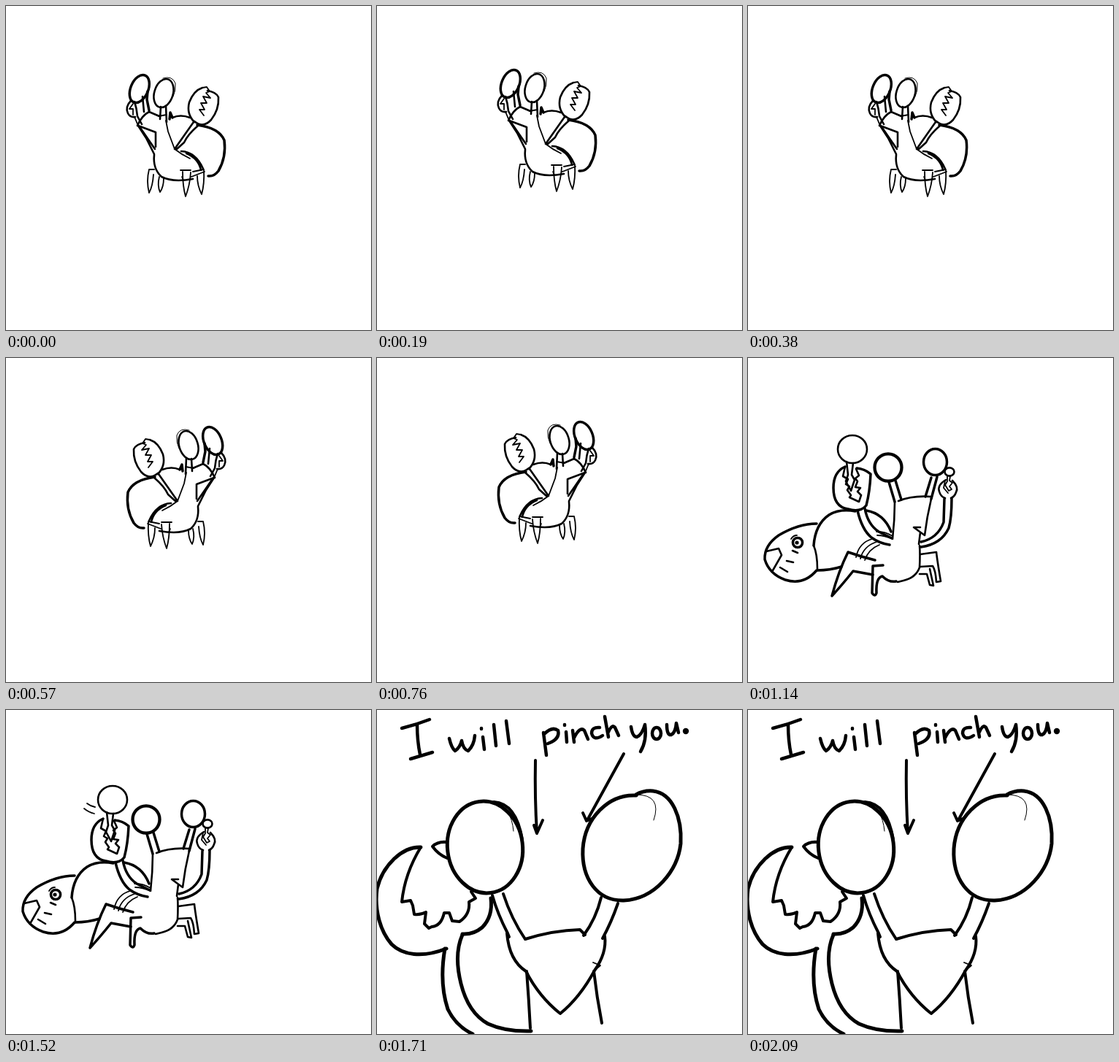
Recreate the animation shown at these times as an HTML page. Size 500x444 px, loop 2280 ms.

```html
<!DOCTYPE html>
<html lang="en">
<head>
<meta charset="utf-8">
<title>Pinching crab</title>
<style>
html, body { margin: 0; width: 100%; height: 100%; overflow: hidden; background: #fff; }
svg { display: block; width: 100vw; height: 100vh; }
path, ellipse { fill: none; stroke: #000; stroke-linecap: round; stroke-linejoin: round; }
.hair { stroke-width: 1; }
.thin { stroke-width: 1.8; }
.mid { stroke-width: 2.6; }
.bold { stroke-width: 3.5; }
.heavy { stroke-width: 4.3; }
#close .bold { stroke-width: 4; }
#close .heavy { stroke-width: 5; }
#words .heavy { stroke-width: 4.5; }
.dot { fill: #000; stroke: none; }
</style>
</head>
<body>
<svg viewBox="0 0 500 444" role="img" aria-label="A small crab dances, then says: I will pinch you.">
  <g id="dance">
    <!-- eyes and stalks -->
    <ellipse class="bold" cx="182.8" cy="113.5" rx="12" ry="20" transform="rotate(23 182.8 113.5)"/>
    <ellipse class="mid" cx="216" cy="119.5" rx="12.8" ry="20" transform="rotate(17 216 119.5)"/>
    <path class="hair" d="M215 99Q228 95 232 106Q233 116 229 124"/>
    <path class="bold" d="M194 117L193 128L196 143"/>
    <path class="mid" d="M187 124L189 145M212 138L211 155M219 137L220 159"/>
    <!-- far claw and arms -->
    <path class="mid" d="M171 130Q163 138 167 147Q170 153 177 152M176 131Q179 140 180 151L186 162"/>
    <path class="thin" d="M174 134L169 141L174 141L174 149M176 152L181 164"/>
    <path class="mid" d="M181 164L192 181L203 203M184 167L204 196"/>
    <!-- head and body -->
    <path class="mid" d="M180 164Q186 150 196 145L210 151M181 164L205 173L205 193"/>
    <path class="thin" d="M209 151L220 149M219 157L222 172L231 196"/>
    <path class="mid" d="M203 204Q201 223 213 234Q228 242 256 237"/>
    <path class="thin" d="M231 196Q241 204 252 209M241 234L243 239"/>
    <!-- shell -->
    <path class="bold" d="M224 155L225 146L228 153"/>
    <path class="mid" d="M228 153Q239 148 252 153M240 199Q260 200 270 223M247 202Q264 209 267 225"/>
    <path class="bold" d="M262 163Q292 167 299 184Q302 207 291 226Q285 234 277 233"/>
    <!-- near claw -->
    <path class="mid" d="M269 112Q257 116 251 132Q247 148 258 159M258 158Q270 168 281 156Q292 142 291 125Q288 118 276 116"/>
    <path class="thin" d="M269 112L275 111L279 117L274 119L280 126L270 124L275 133L267 133L272 142L265 142L271 150"/>
    <path class="mid" d="M257 159L231 196M263 164Q249 176 244 187L234 196"/>
    <!-- legs -->
    <path class="thin" d="M203 224L196 224Q192 240 196 256Q201 247 202 231M210 234Q207 246 211 255Q216 248 216 236"/>
    <path class="thin" d="M239 225L253 225M242 227Q242 247 246 261Q252 245 253 228M256 227L271 224Q272 244 268 258Q262 246 262 233M254 234L272 227"/>
  </g>

  <g id="pinch">
    <!-- shell with its face -->
    <path class="bold" d="M94 227Q69 227 42 243Q22 257 23 276Q29 296 51 304Q76 312 94 291"/>
    <path class="mid" d="M25 265L42 261L46 270L34 291M44 287L54 293M53 278L62 280M61 264L68 267"/>
    <ellipse class="bold" cx="68" cy="253" rx="6.6" ry="6.6"/>
    <ellipse class="dot" cx="67" cy="253" rx="2.6" ry="2.6"/>
    <path class="thin" d="M59 248Q62 243 67 243"/>
    <path class="bold" d="M90 257Q92 228 111 215Q126 206 147 210M162 209Q186 213 196 238M95 291Q112 291 128 286"/>
    <path class="mid" d="M90 257Q95 269 95 289"/>
    <path class="thin" d="M148 273Q152 253 170 248M154 275Q158 258 176 252M160 277Q165 262 180 256M176 238Q186 237 198 244M177 243Q187 243 198 248"/>
    <!-- left arm and claw -->
    <path class="bold" d="M133 149Q117 156 117 178Q117 204 137 207Q154 212 162 202Q167 183 168 159Q160 152 149 151"/>
    <path class="bold" d="M150 209Q156 235 169 246Q180 254 194 256M160 206Q164 228 179 238L197 247"/>
    <path class="mid" d="M133 149L130 162L137 166L134 173L139 176L136 181L141 188L139 191L152 197L155 188L150 183L154 178L147 177L150 169L147 165L152 161L148 152"/>
    <g id="prey">
      <ellipse class="mid" cx="146" cy="123" rx="20" ry="19"/>
      <path class="mid" d="M138 140L140 158L137 167L144 180M147 142L145 158L149 165L144 180"/>
    </g>
    <path id="whoosh" class="thin" d="M111 128Q116 132 122 133M107 135Q113 140 121 142"/>
    <!-- eyes, stalks and head -->
    <ellipse class="heavy" cx="192" cy="150" rx="18.5" ry="18.7"/>
    <ellipse class="bold" cx="256.5" cy="142.5" rx="16" ry="18"/>
    <path class="bold" d="M193 170L201 197M202 168L210 194M251 164L243 190M259 163L251 193"/>
    <path class="mid" d="M206 196Q225 188 251 190M201 197Q201 222 198 248M251 193Q245 218 242 243L227 232L236 232M236 239L234 255"/>
    <path class="mid" d="M235 257Q236 269 235 287Q230 301 213 305L205 307"/>
    <!-- right arm and claw -->
    <path class="bold" d="M237 252Q260 247 268 225L269 193M237 259Q265 255 275 233Q279 219 279 192"/>
    <path class="mid" d="M271 167Q259 174 262 183Q264 190 270 192M280 168Q289 177 285 184Q283 190 278 192"/>
    <ellipse class="mid" cx="276" cy="156" rx="6.5" ry="5.6"/>
    <path class="thin" d="M273 161L273 169L270 174L275 182L279 180L276 176L280 171L276 168L277 162M270 168L268 178L274 185"/>
    <!-- legs -->
    <path class="bold" d="M174 277Q154 272 137 266Q124 292 115 326Q128 312 144 292L171 297"/>
    <path class="bold" d="M185 284L171 285L170 322Q174 328 176 322Q175 301 184 299Q193 308 203 306"/>
    <path class="mid" d="M236 269L258 266Q259 276 264 306L258 307Q257 291 253 285L236 286M235 296L245 296L249 311L254 312L249 289"/>
  </g>

  <g id="close">
    <!-- eyes -->
    <ellipse class="heavy" cx="148" cy="188" rx="51.5" ry="63" transform="rotate(-7 148 188)"/>
    <path class="bold" d="M160 126Q191 128 199 178"/>
    <path class="hair" d="M161 125Q184 133 187 166"/>
    <path class="heavy" d="M355 117C317 115 285 148 282 190C280 230 301 262 338 261C381 259 412 220 416 183C418 148 405 114 378 111Q365 110 355 116"/>
    <path class="hair" d="M355 116Q391 116 379 151"/>
    <!-- claw and arm -->
    <path class="bold" d="M95 181Q83 180 76 187Q84 198 96 203"/>
    <path class="heavy" d="M60 188C35 187 8 212 0 245C-4 275 5 304 20 321C35 336 62 340 95 327"/>
    <path class="bold" d="M60 188Q38 224 34 263L46 261L49 268L51 280Q60 281 67 277L65 293L71 299L75 297Q88 296 92 278L99 278L103 289L113 290Q128 280 126 263L135 258L129 249"/>
    <path class="heavy" d="M156 258Q159 283 144 298Q132 308 117 307"/>
    <path class="heavy" d="M93 327Q85 374 97 410Q108 433 131 444M117 308Q105 335 115 375Q125 415 152 430Q176 441 211 440"/>
    <!-- stalks and head -->
    <path class="bold" d="M158 254Q165 279 179 306L181 311M173 252Q184 286 203 314M307 257Q300 286 283 309M330 265Q321 291 309 313"/>
    <path class="bold" d="M203 314Q241 302 278 301L285 308M178 306Q181 343 204 358Q222 393 251 416Q278 394 298 357Q315 333 312 310"/>
    <path class="bold" d="M205 358Q208 397 210 436M297 358Q301 393 308 429"/>
    <path class="thin" d="M296 346L306 350L298 357M200 354L207 361"/>
    <!-- arrows -->
    <path class="bold" d="M217 69Q216 120 219 169M215 158L219 169L227 151M338 60L288 151M282 141L287 152L294 149"/>
    <!-- hand lettering: "I will pinch you." -->
    <g id="words">
      <path class="heavy" d="M34 25Q54 20 72 13M55 20Q55 42 59 61M46 67L76 58"/>
      <path class="heavy" d="M99 39Q102 52 107 56Q114 51 116 42Q118 54 125 56Q133 48 134 35"/>
      <path class="heavy" d="M145 37L147 54M143 25L143 26M160 20L163 49M177 15L181 46"/>
      <path class="heavy" d="M228 31L232 62M229 33Q240 22 248 28Q251 40 234 46"/>
      <path class="heavy" d="M259 30L260 44M257 20L257 21M268 28L270 44M270 38Q278 22 284 28L289 40"/>
      <path class="heavy" d="M305 24Q294 23 294 32Q297 43 309 35M312 9L317 37M317 30Q322 19 326 24L331 35"/>
      <path class="heavy" d="M348 23Q350 37 356 37Q363 34 367 20M367 20Q370 42 361 57"/>
      <ellipse class="heavy" cx="383" cy="32" rx="6" ry="8"/>
      <path class="heavy" d="M397 20Q397 35 403 34Q409 31 410 18L413 31"/>
      <ellipse class="dot" cx="423" cy="29" rx="4.2" ry="4.2"/>
    </g>
  </g>
</svg>
<script>
const STEP = 190, STEPS = 12;
const [dance, pinch, close, prey, whoosh, words] =
  ["dance", "pinch", "close", "prey", "whoosh", "words"].map(id => document.getElementById(id));
const sways = ["translate(-3 2)", "rotate(-20 144 178)", ""];

const show = (el, on) => el.setAttribute("visibility", on ? "inherit" : "hidden");
const move = (el, value) => el.setAttribute("transform", value);

function draw(time) {
  const step = Math.floor(time / STEP) % STEPS;
  const beat = step % 3;
  show(dance, step < 6);
  show(pinch, step >= 6 && step < 9);
  show(close, step >= 9);

  // Three beats facing left, three facing right, with a hop on the middle beat.
  const hop = beat === 1 ? -7 : 0;
  move(dance, step < 3 ? `translate(0 ${hop})` : `translate(466 ${hop}) scale(-1 1)`);

  move(prey, sways[beat]);
  show(whoosh, step === 8);
  move(words, beat === 1 ? "translate(2 4)" : "");
}

const start = performance.now();
function tick() {
  draw(performance.now() - start);
  requestAnimationFrame(tick);
}
tick();
</script>
</body>
</html>
```
